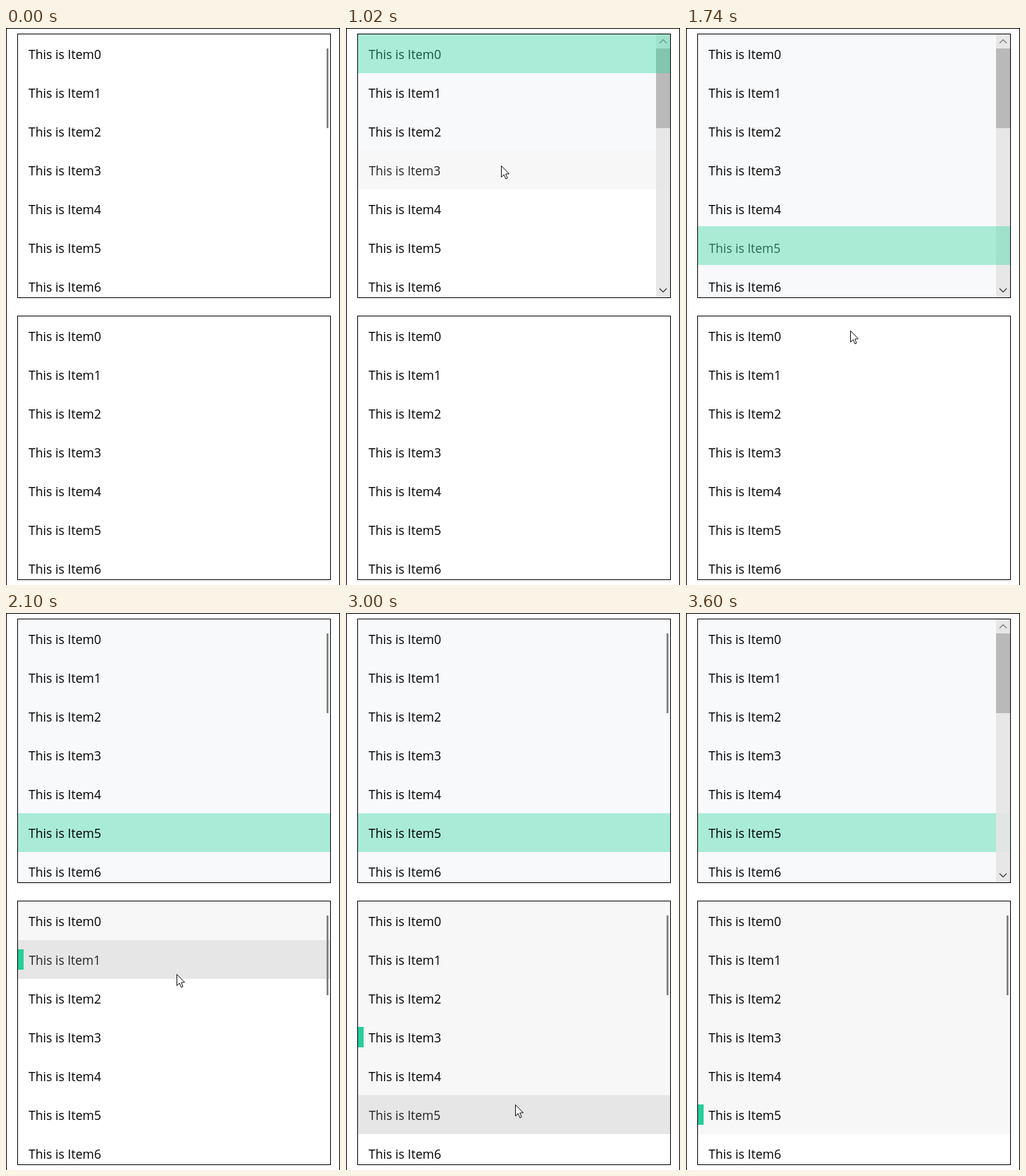
An HTML page with a canvas for the animation above (3.99 s loop, 474 by 790 pixels).

```html
<!DOCTYPE html>
<html lang="en">
<head>
<meta charset="utf-8">
<title>List selection</title>
<style>
  html, body { margin: 0; width: 100%; height: 100%; overflow: hidden; background: #fff; }
  canvas { display: block; }
</style>
</head>
<body>
<canvas id="stage" width="474" height="790"></canvas>
<script>
const ctx = document.getElementById('stage').getContext('2d');
const LOOP = 3990, TICK = 30, SLIDE = 285, HOVER_LAG = 60;
const LEFT = 17, WIDTH = 443, ROW = 55, ROWS = 7, VIEW = 373;
const ACCENT = '#28cd9b', GLIDE = '#33d6a1', SELECTED = '#a9ebd7';
const HOVER = '#e6e6e6', COOL = '#f8f9fb', WARM = '#f7f7f7';

// The pointer eases from stop to stop.
const stops = [
  { at: 90, x: 476, y: 42 },
  { at: 720, x: 246, y: 30 },
  { at: 1020, x: 220, y: 195 },
  { at: 1410, x: 203, y: 294 },
  { at: 1935, x: 246, y: 490 },
  { at: 2490, x: 228, y: 594 },
  { at: 3000, x: 240, y: 697 },
  { at: 3450, x: 380, y: 383 },
  { at: 3540, x: 476, y: 345 }
];

const lists = [
  {
    top: 9, glides: true, visited: COOL, barFrom: 0,
    picks: [{ at: 690, row: 0 }, { at: 1020, row: 3 }, { at: 1540, row: 5 }],
    barWidth: t => Math.max(ramp(t, 300, 90) - ramp(t, 1950, 120), ramp(t, 3500, 90))
  },
  {
    top: 409, glides: false, visited: WARM, barFrom: 1800,
    picks: [{ at: 2040, row: 1 }, { at: 2500, row: 3 }, { at: 3010, row: 5 }],
    barWidth: () => 0
  }
];

const ramp = (t, start, length) => Math.min(1, Math.max(0, (t - start) / length));
const mix = (a, b, p) => a + (b - a) * p;
const smooth = p => p * p * (3 - 2 * p);
const easeOut = p => 1 - (1 - p) ** 3;

function pointerAt(t) {
  const i = stops.findIndex(stop => stop.at > t);
  if (i < 1) return null;
  const a = stops[i - 1], b = stops[i];
  const p = smooth((t - a.at) / (b.at - a.at));
  return { x: mix(a.x, b.x, p), y: mix(a.y, b.y, p) };
}

function hoveredRow(list, t) {
  const point = pointerAt(t) && pointerAt(t - HOVER_LAG);
  if (!point || point.x < LEFT || point.x >= LEFT + WIDTH) return -1;
  const y = point.y - list.top;
  return y >= 0 && y < VIEW ? Math.floor(y / ROW) : -1;
}

// Rows keep a faint tint once the pointer has touched them.
function visitedRows(list, t) {
  const rows = new Set();
  for (let k = 0; k <= t; k += TICK) rows.add(hoveredRow(list, k));
  return rows;
}

function selectionAt(list, t) {
  const i = list.picks.filter(pick => pick.at <= t).length - 1;
  if (i < 0) return null;
  const { at, row } = list.picks[i];
  const from = i ? list.picks[i - 1].row : row;
  const p = ramp(t, at, SLIDE);
  return { row, moving: i > 0 && p < 1, y: list.top + mix(from, row, easeOut(p)) * ROW };
}

function isPressed(list, row, t) {
  return list.picks.some(pick => pick.row === row && t >= pick.at - 70 && t < pick.at + 240);
}

function fill(color, x, y, w, h) {
  ctx.fillStyle = color;
  ctx.fillRect(x, y, w, h);
}

function chevron(y, direction, color) {
  ctx.strokeStyle = color;
  ctx.lineWidth = 1.2;
  ctx.beginPath();
  ctx.moveTo(445, y + 2.5 * direction);
  ctx.lineTo(450, y - 2.5 * direction);
  ctx.lineTo(455, y + 2.5 * direction);
  ctx.stroke();
  ctx.lineWidth = 1;
}

function drawScrollbar(list, t) {
  if (t < list.barFrom) return;
  const wide = list.barWidth(t);
  if (wide < 1) fill('#7a7a7a', 455, list.top + 20, 2.5, 113);
  if (wide <= 0) return;
  ctx.globalAlpha = wide;
  fill('rgba(230,230,230,.9)', 440, list.top, 20, VIEW);
  fill('#b9b9b9', 440, list.top + 20, 20, 113);
  chevron(list.top + 10, 1, '#777');
  chevron(list.top + 363, -1, '#333');
  ctx.globalAlpha = 1;
}

function drawRow(list, row, color, pressed) {
  const y = list.top + row * ROW;
  fill(color, LEFT, y, WIDTH, ROW);
  ctx.font = `${pressed ? 17.4 : 17.65}px "Open Sans", "Noto Sans", sans-serif`;
  ctx.fillStyle = pressed ? '#222' : '#000';
  ctx.fillText('This is Item' + row, pressed ? 32.5 : 32, y + 35);
}

function drawList(list, t) {
  const visited = visitedRows(list, t);
  const selection = selectionAt(list, t);
  const hovered = hoveredRow(list, t);

  ctx.save();
  ctx.beginPath();
  ctx.rect(LEFT, list.top, WIDTH, VIEW);
  ctx.clip();

  for (let row = 0; row < ROWS; row++) {
    let color = visited.has(row) ? list.visited : '#fff';
    if (list.glides && selection?.row === row) color = selection.moving ? WARM : SELECTED;
    else if (row === hovered) color = HOVER;
    drawRow(list, row, color, isPressed(list, row, t));
  }

  drawScrollbar(list, t);
  if (selection && !list.glides) fill(ACCENT, LEFT, selection.y + 13, 8, 29);
  if (selection?.moving && list.glides) {
    ctx.globalAlpha = 0.4;
    fill(GLIDE, LEFT, selection.y, WIDTH, ROW);
    ctx.globalAlpha = 1;
  }
  ctx.restore();

  ctx.strokeStyle = '#000';
  ctx.strokeRect(16.5, list.top - 0.5, 444, 374);
}

function drawPointer(point) {
  if (!point) return;
  const outline = [[0, 0], [0, 16], [3.7, 12.5], [6.3, 18.5], [8.6, 17.4], [6.2, 11.6], [11, 11.3]];
  ctx.save();
  ctx.translate(Math.round(point.x) + 0.5, Math.round(point.y) + 0.5);
  ctx.beginPath();
  outline.forEach(([x, y]) => ctx.lineTo(x, y));
  ctx.closePath();
  ctx.fillStyle = '#fff';
  ctx.fill();
  ctx.strokeStyle = '#111';
  ctx.stroke();
  ctx.restore();
}

function draw(t) {
  fill('#000', 0, 0, 474, 790);
  fill('#fff', 1, 1, 472, 789);
  lists.forEach(list => drawList(list, t));
  drawPointer(pointerAt(t));
}

const start = performance.now();
function loop() {
  const t = (performance.now() - start) % LOOP;
  draw(Math.floor(t / TICK) * TICK);
  requestAnimationFrame(loop);
}
loop();
</script>
</body>
</html>
```
